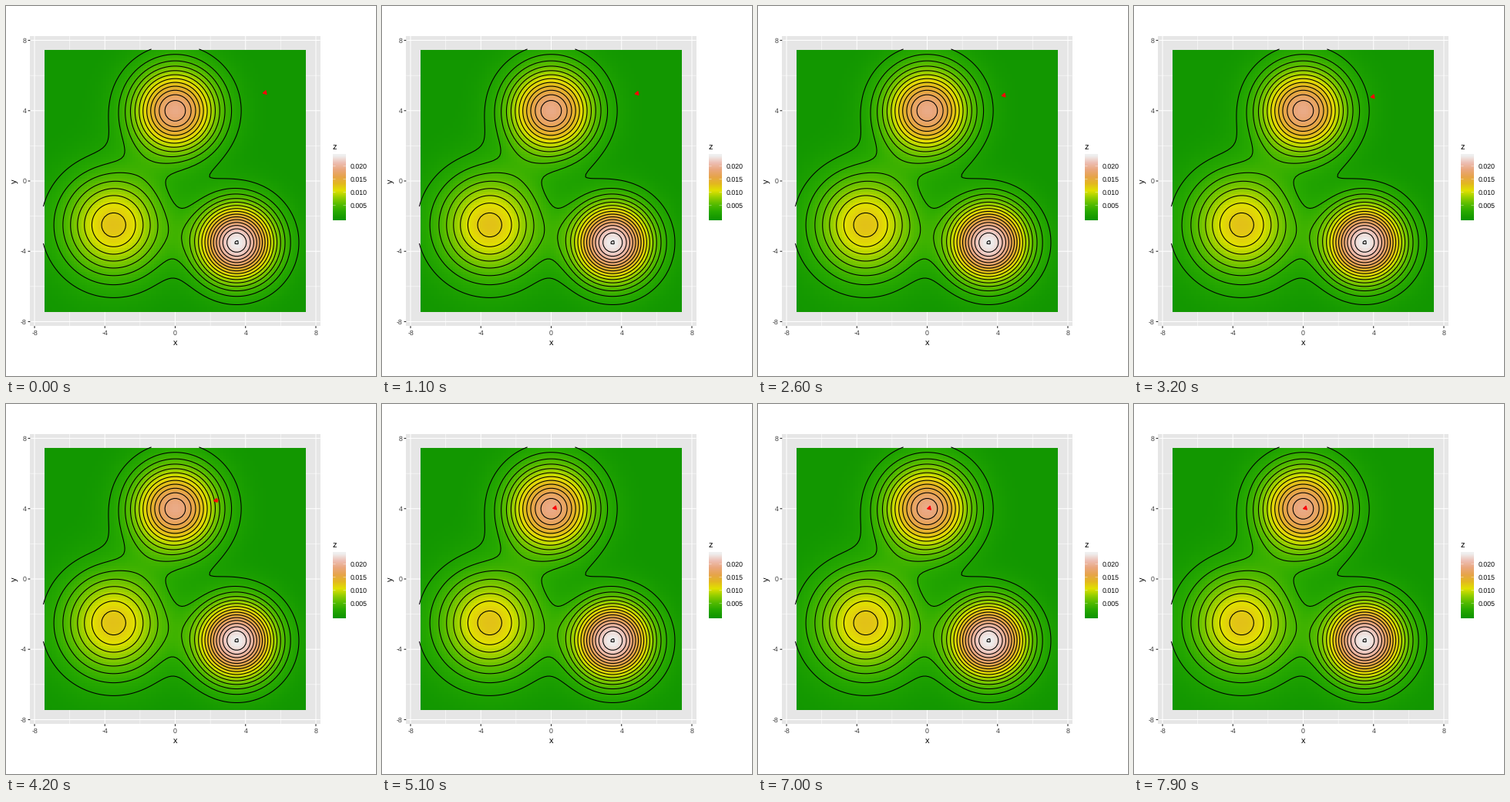
These frames come from a looping animation (480x480 px, 8000 ms). A matplotlib script:

```python
import numpy as np
import matplotlib.pyplot as plt
from matplotlib.animation import FuncAnimation
from matplotlib.colors import LinearSegmentedColormap
from matplotlib.patches import Polygon, Rectangle

SIZE, FRAMES, INTERVAL = 480, 80, 100
CX, CY, UNIT = 219.5, 227.0, 22.81
RATE = 53.3
HEAD = 5.2
LINE = 1.07
RED = "#fc0008"

# x, y, height, variance of each hill
HILLS = [(0, 4, 0.01915, 2.765), (-3.5, -2.5, 0.01273, 4.0), (3.5, -3.5, 0.02405, 2.25)]

TERRAIN = ["#129700", "#27a900", "#54bb00", "#93ce00", "#e1e100",
           "#e3b81f", "#e7a44b", "#eaa77d", "#edbfb4", "#efefef"]
cmap = LinearSegmentedColormap.from_list("terrain10", TERRAIN, N=512)

plt.rcParams["font.family"] = "Liberation Sans"
plt.rcParams["text.hinting"] = "none"


def px(x):
    return CX + UNIT * np.asarray(x)


def py(y):
    return CY - UNIT * np.asarray(y)


def height(x, y):
    return sum(h * np.exp(-((x - a) ** 2 + (y - b) ** 2) / (2 * v))
               for a, b, h, v in HILLS)


def gradient(p):
    g = np.zeros(2)
    for a, b, h, v in HILLS:
        d = np.array([a, b]) - p
        g += h * np.exp(-d @ d / (2 * v)) * d / v
    return g


def climb(start, steps):
    path = [np.array(start, float)]
    for _ in range(steps):
        path.append(path[-1] + RATE * gradient(path[-1]))
    return np.array(path)


fig = plt.figure(figsize=(SIZE / 72, SIZE / 72), dpi=72, facecolor="white")
ax = fig.add_axes([0, 0, 1, 1])
ax.axis("off")


def line(xs, ys, color, width, z):
    return ax.plot(xs, ys, color=color, lw=width, zorder=z,
                   solid_capstyle="butt", snap=False)[0]


def label(x, y, text, size, color="black", **kw):
    ax.text(x, y, text, fontsize=size, color=color, **kw)


# Panel, grid lines and axes
left, right, top, bottom = px(-8.25), px(8.25), py(8.25), py(-8.25)
ax.add_patch(Rectangle((left, top), right - left, bottom - top,
                       fc="#e6e6e6", lw=0, zorder=0))
for width, ticks in ((LINE / 2, (-6, -2, 2, 6)), (LINE, (-8, -4, 0, 4, 8))):
    for t in ticks:
        line([px(t)] * 2, [top, bottom], "white", width, 1)
        line([left, right], [py(t)] * 2, "white", width, 1)
for t in (-8, -4, 0, 4, 8):
    line([px(t)] * 2, [bottom, bottom + 2.75], "#252525", LINE, 2)
    line([left - 2.75, left], [py(t)] * 2, "#252525", LINE, 2)
    label(px(t), 426.8, str(t), 8.8, "#3c3c3c", ha="center", va="baseline")
    label(left - 5, py(t) + 3.2, str(t), 8.8, "#3c3c3c", ha="right", va="baseline")
label(CX, 440, "x", 11, ha="center", va="baseline")
label(11.5, CY, "y", 11, ha="center", va="center", rotation=90)

# Surface and contours; the outermost tiles are cut off
grid = np.linspace(-7.5, 7.5, 100)
edge = 7.5 - (grid[1] - grid[0]) / 2
X, Y = np.meshgrid(grid, grid)
Z = height(X, Y)
zmax = Z.max()
ax.imshow(Z[1:-1, 1:-1], cmap=cmap, vmin=0, vmax=zmax, origin="lower",
          extent=np.round([px(-edge), px(edge), py(-edge) + 0.3, py(edge) - 0.3]),
          aspect="auto", interpolation="nearest", zorder=3)
ax.contour(px(X), py(Y), Z, levels=0.0015 * np.arange(1, 17),
           colors="black", linewidths=LINE, zorder=4)

# Colour bar
x0, x1, y0, y1 = 424, 441, 192, 278
ax.imshow(np.linspace(0, 1, 20)[:, None], cmap=cmap, origin="lower",
          extent=(x0, x1, y1, y0), aspect="auto",
          interpolation="bilinear", zorder=3)
pad = (y1 - y0) / 40
for v in (0.005, 0.010, 0.015, 0.020):
    y = y1 - pad - (y1 - y0 - 2 * pad) * v / zmax
    line([x0, x0 + 3.5], [y, y], "white", 0.4, 5)
    line([x1 - 3.5, x1], [y, y], "white", 0.4, 5)
    label(447, y + 2.7, f"{v:.3f}", 8.8, ha="left", va="baseline")
label(424, 185.5, "z", 11, ha="left", va="baseline")

# Climbing arrow
path = climb((5, 5), FRAMES)
points = np.column_stack([px(path[:, 0]), py(path[:, 1])])
shaft = line([], [], RED, LINE, 6)
head = ax.add_patch(Polygon(np.zeros((3, 2)), fc=RED, ec=RED, lw=LINE,
                            joinstyle="miter", zorder=6))
ax.set_xlim(0, SIZE)
ax.set_ylim(SIZE, 0)


def update(i):
    tail, tip = points[i], points[i + 1]
    dx, dy = tail - tip
    back = np.arctan2(dy, dx)
    wings = [tip + HEAD * np.array([np.cos(back + s), np.sin(back + s)])
             for s in (-np.pi / 6, np.pi / 6)]
    shaft.set_data([tail[0], tip[0]], [tail[1], tip[1]])
    head.set_xy([wings[0], tip, wings[1]])
    return shaft, head


anim = FuncAnimation(fig, update, frames=FRAMES, interval=INTERVAL,
                     repeat=True, repeat_delay=0, blit=False)
plt.show()
```
